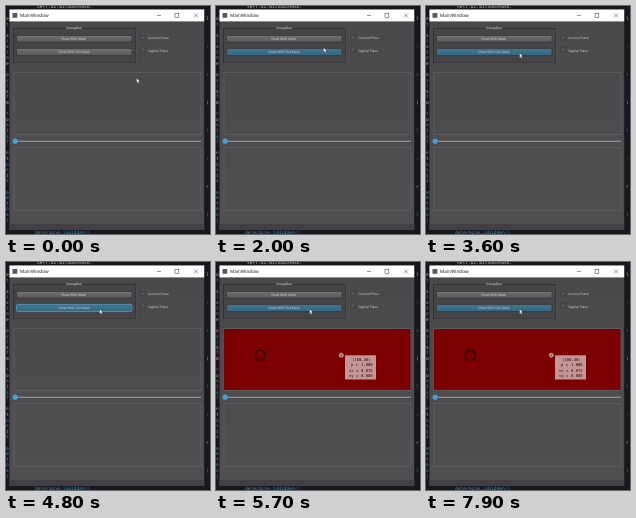
Recreate the animation shown at these times as an HTML page. Size 204x228 px, loop 8 s.

```html
<!DOCTYPE html>
<html lang="en">
<head>
<meta charset="utf-8">
<title>MainWindow</title>
<style>
  html, body { margin: 0; width: 100%; height: 100%; overflow: hidden; background: #17171d; }
  svg { display: block; width: 204px; height: 228px; }
  text { font-family: "Open Sans", "Liberation Sans", sans-serif; font-size: 3.3px; fill: #dedee0; text-rendering: geometricPrecision; white-space: pre; }
  .mid { text-anchor: middle; }
  .code text { font-family: "DejaVu Sans Mono", monospace; font-size: 4.6px; }
  .tip text { font-family: "DejaVu Sans Mono", monospace; font-size: 3.9px; fill: #251010; }
  .panel { fill: none; stroke: #686669; stroke-width: .6; }
</style>
</head>
<body>
<svg viewBox="0 0 204 228">
  <defs>
    <linearGradient id="body" x2="0" y2="1">
      <stop stop-color="#4a484b"/><stop offset="1" stop-color="#504e51"/>
    </linearGradient>
    <linearGradient id="grey" x2="0" y2="1">
      <stop stop-color="#747275"/><stop offset=".5" stop-color="#656366"/><stop offset="1" stop-color="#5a585b"/>
    </linearGradient>
    <linearGradient id="blue" x2="0" y2="1">
      <stop stop-color="#437690"/><stop offset="1" stop-color="#326885"/>
    </linearGradient>
  </defs>

  <rect width="204" height="228" fill="#17171d"/>
  <g class="code" id="code">
    <text x="31" y="2" style="fill:#c4c8ce">self.ui.withoutMask.</text>
    <text x="29" y="227.5" style="fill:#3e91b8">determine.isHidden()</text>
  </g>

  <rect x="3.5" y="3.5" width="194.7" height="220.5" fill="url(#body)"/>
  <rect x="3.5" y="218" width="194.7" height="6" fill="#424043"/>
  <rect x="3.5" y="3.5" width="194.7" height="11.9" fill="#fff"/>
  <rect x="6.5" y="7" width="4.8" height="4.8" fill="#555b60"/>
  <text x="14" y="11.2" style="font-size:4.7px;fill:#111">MainWindow</text>
  <g fill="none" stroke="#333" stroke-width=".5">
    <path d="M151 9.5h4M188 7.5l4 4m0-4l-4 4"/>
    <rect x="169" y="7.5" width="3.8" height="3.8"/>
  </g>

  <rect x="7.5" y="22.5" width="122" height="34.5" fill="#464447" stroke="#2d2b2e" stroke-width=".8"/>
  <path d="M7.5 57.6h122.6V22.5" fill="none" stroke="#5b595c" stroke-width=".5"/>
  <rect x="59.5" y="19.5" width="17" height="4.6" fill="#484649"/>
  <text class="mid" x="68" y="23.2">GroupBox</text>

  <rect x="10.5" y="29.5" width="115.5" height="6.6" rx="1" fill="url(#grey)" stroke="#353336" stroke-width=".7"/>
  <text class="mid" x="67.5" y="34">Show With Mask</text>
  <rect id="button" x="10.5" y="42.4" width="115.5" height="7.2" rx="1" fill="url(#grey)" stroke="#353336" stroke-width=".7"/>
  <rect id="focus" x="10.5" y="42.4" width="115.5" height="7.2" rx="1" fill="none" stroke="#5aa5c8" stroke-width=".8"/>
  <text class="mid" x="68" y="47.3">Show With Out Mask</text>

  <g fill="#575558" stroke="#39373a" stroke-width=".6">
    <rect x="135" y="29.6" width="4" height="4"/>
    <rect x="135" y="41.8" width="4" height="4"/>
  </g>
  <text x="142" y="33.2" style="font-size:3.2px">Coronal Plane</text>
  <text x="142" y="45.5" style="font-size:3.2px">Sagittal Plane</text>

  <rect class="panel" x="8" y="66.4" width="187" height="62.2"/>
  <rect class="panel" x="8" y="141.3" width="187" height="62.8"/>
  <path d="M7 135.2H195" stroke="#3a383b" stroke-width="2"/>
  <path d="M7 135.2H195" stroke="#b4b2b5" stroke-width="1"/>
  <circle cx="9.2" cy="135.2" r="2.6" fill="#3ba4da"/>

  <g id="result">
    <rect x="8" y="67" width="186.5" height="61" fill="#7c0000"/>
    <circle cx="44.3" cy="93.2" r="5" fill="none" stroke="#160000" stroke-width="1.3" stroke-dasharray="6.8 1.05"/>
    <circle cx="125.3" cy="93.2" r="2" fill="#a77" stroke="#cbb5b5" stroke-width=".8"/>
    <circle cx="125.3" cy="93.2" r=".7" fill="#555"/>
    <g class="tip">
      <rect x="129" y="93.3" width="31" height="24.2" fill="#c49696"/>
      <text x="136" y="98.8">(100,40)</text>
    </g>
  </g>

  <path id="pointer" d="M0 0V4.9L1.1 3.9L1.9 5.7L2.8 5.3L2 3.6H3.5Z" fill="#fff" stroke="#181818" stroke-width=".35"/>
</svg>
<script>
const LOOP = 8000;
const SHOW_AT = 5000;
const get = id => document.getElementById(id);

function addText(parent, x, y, content, fill) {
  const node = document.createElementNS("http://www.w3.org/2000/svg", "text");
  node.setAttribute("x", x);
  node.setAttribute("y", y);
  node.textContent = content;
  if (fill) node.style.fill = fill;
  parent.append(node);
}

// Fragments of the editor visible beside the window
const tones = ["#a8a8ae", "#408fae", "#78658d", "#b4b4b8", "#4f9a86"];
for (let i = 0; i < 38; i++) {
  const y = 14 + i * 5.6;
  if (i % 7 !== 2) addText(get("code"), 0, y, "etos)sfm"[i % 8], i > 30 ? tones[1] : tones[i % 5]);
  if (i % 5 === 0) addText(get("code"), 200, y, "l:r)"[i / 5 % 4], i > 30 ? tones[4] : tones[i % 3]);
}

const tip = document.querySelector(".tip");
[["p", "1.000"], ["vx", "0.075"], ["vy", "0.000"]].forEach(([name, value], i) => {
  const y = 104.3 + i * 5.4;
  addText(tip, i ? 133 : 135, y, name + " =");
  addText(tip, 145, y, value);
});

// Pointer tip: time, x, y
const path = [
  [0, 130.5, 72], [100, 129, 69], [600, 116, 54], [1100, 116, 54],
  [1200, 114, 52], [1300, 114, 52], [1500, 112, 47], [1600, 112, 47],
  [2000, 107.5, 41.5], [2400, 96, 45.5], [2500, 96, 45.5], [2700, 93.5, 47], [LOOP, 93.5, 47]
];

function locate(time) {
  const i = path.findIndex(step => step[0] > time);
  const [t0, x0, y0] = path[i - 1];
  const [t1, x1, y1] = path[i];
  const k = (time - t0) / (t1 - t0);
  return [x0 + (x1 - x0) * k, y0 + (y1 - y0) * k];
}

function draw(now) {
  const time = Math.floor(now % LOOP / 100) * 100;
  const [x, y] = locate(time);
  const hover = x >= 10 && x <= 126 && y >= 41 && y <= 50;
  get("pointer").setAttribute("transform", `translate(${x} ${y})`);
  get("button").setAttribute("fill", `url(#${hover ? "blue" : "grey"})`);
  get("focus").style.opacity = time >= 4800 && time < SHOW_AT ? 1 : 0;
  get("result").style.visibility = time >= SHOW_AT ? "visible" : "hidden";
}

const start = performance.now();
function tick() {
  draw(performance.now() - start);
  requestAnimationFrame(tick);
}
tick();
</script>
</body>
</html>
```
